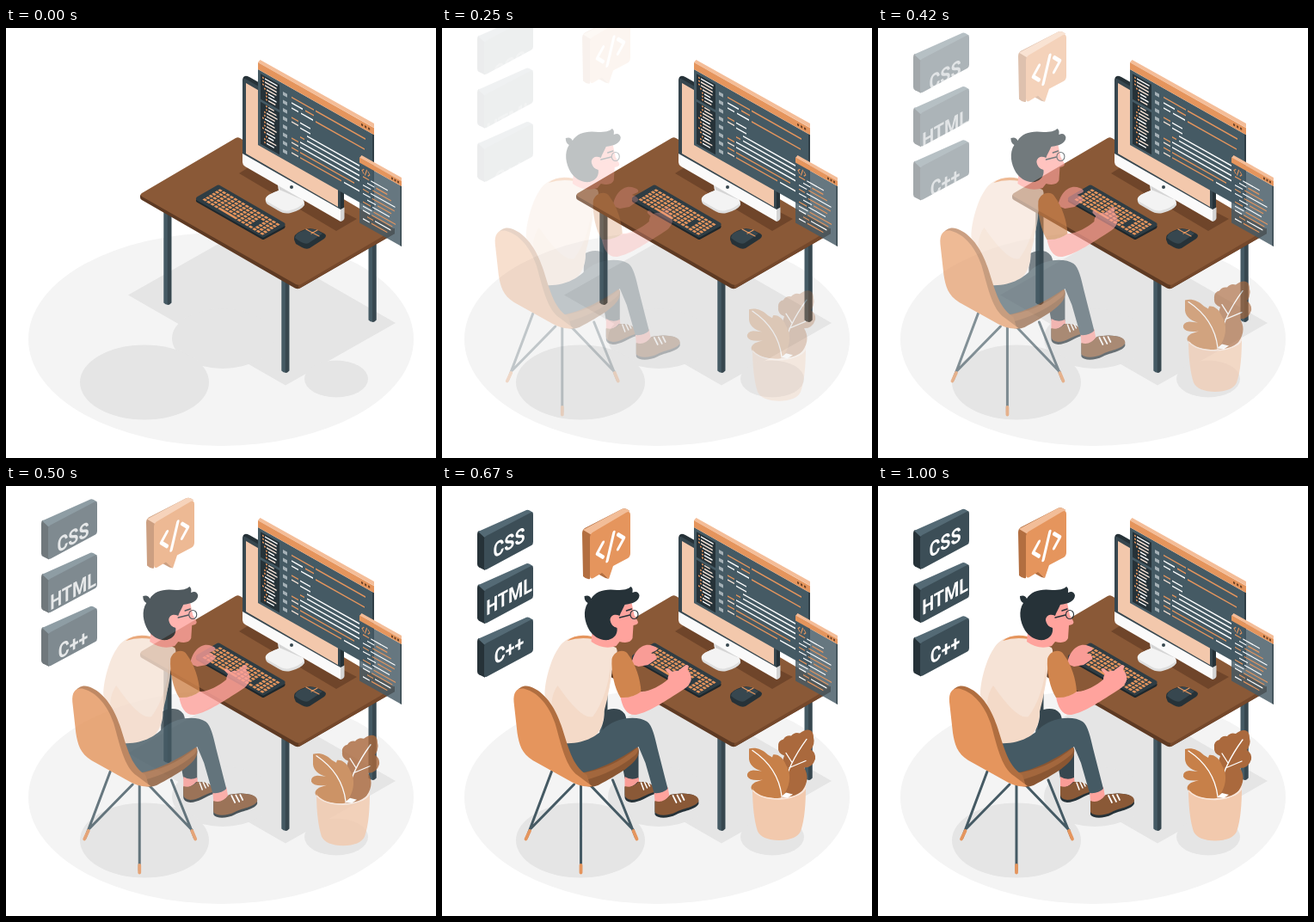
Write an HTML page that moves like this. It is 500 px wide and 500 px high and loops after 1.04 s.

```html
<!DOCTYPE html>
<html lang="en">
<head>
<meta charset="utf-8">
<title>Developer at a desk</title>
<style>
html, body { margin: 0; width: 100%; height: 100%; overflow: hidden; background: #fff; }
svg { display: block; width: 100%; height: 100%; }
text { font: 700 24px Roboto, Arial, sans-serif; fill: #fff; text-anchor: middle; }
.line { fill: none; stroke-linecap: round; stroke-linejoin: round; }
</style>
</head>
<body>
<svg viewBox="0 0 500 500">
  <!-- floor -->
  <ellipse cx="250" cy="362" rx="224" ry="124" fill="#f4f4f4"/>
  <g fill="#e5e5e5">
    <path d="M142 310.500L270 238 453 343 325 415.500Z"/>
    <ellipse cx="252" cy="361" rx="59" ry="35"/>
    <ellipse cx="161" cy="412" rx="75" ry="43.500"/>
    <ellipse cx="384" cy="408" rx="37" ry="21.500"/>
  </g>

  <!-- desk -->
  <g id="deskLegs"></g>
  <path d="M156 194V197Q156 199 158 200L336 302.500Q339 304 342 302.500L452 239V233L340 296Z" fill="#5e3a23"/>
  <path d="M340 297V303.300L452 239V233Z" fill="#75482b"/>
  <path d="M158 192Q155 194 158 196L337 298Q340 299.500 343 298L452 234 272 128Q269.500 126.500 267 128Z" fill="#8a5937"/>
  <path d="M271 169L287 159 408 222 384 236Z" fill="#6f452a"/>

  <!-- monitor -->
  <path d="M302 198Q303 194 317 189L316 180 343 195V198Q348 202 347 206 343 212 331 215 324 217 316 212L304 205Q301 202 302 198Z" fill="#dedede"/>
  <path d="M302 198Q303 194 317 189L316 180 343 195V198Q348 201 346 204 341 209 330 212 324 214 316 209L304 202Q301 200 302 198Z" fill="#f3f3f3"/>
  <path d="M317 182L343 197 343 199 318 188Z" fill="#d5d5d5"/>
  <path d="M275 62Q275 53 283 57L389 117Q393 119 393 124V211L389 213 275 148Z" fill="#263238"/>
  <path d="M275 63Q275 57 280 60L385 120Q389 122 389 127V213L275 148Z" fill="#37474f"/>
  <path d="M279 64L386 126V208L279 146Z" fill="#f3c8ac"/>
  <path d="M275 146L389 211V225L278 161Q275 159 275 156Z" fill="#fafafa"/>
  <path d="M389 211L393.500 208.500V221Q393 224 389 225Z" fill="#d4d4d4"/>
  <circle cx="332" cy="185" r="2" fill="#37474f"/>

  <!-- large window -->
  <path d="M293 40L295.500 37 428 111V116Z" fill="#f4bd98"/>
  <g transform="matrix(1 .565 0 1 293 40)">
    <path d="M0 8H135V96H0Z" fill="#455a64"/>
    <path d="M133 8H135V96H133Z" fill="#2f3e46"/>
    <path d="M0 0H135V8H0Z" fill="#e5955d"/>
    <path d="M120 3h2.200v2.500h-2.200zM124 3h2.200v2.500h-2.200zM128 3h2.200v2.500h-2.200z" fill="#6e4428"/>
    <path d="M3 11.500H25V41H3ZM3 44H25V93H3Z" fill="#263238"/>
    <g id="code" stroke-width="1.600"></g>
  </g>

  <!-- small window -->
  <path d="M411 151L413.500 148 460 174V178Z" fill="#f4bd98"/>
  <g transform="matrix(1 .56 0 1 411 150.500)">
    <path d="M0 6H49V76H0Z" fill="#455a64" opacity=".82"/>
    <path d="M47.500 6H49V76H47.500Z" fill="#37474f"/>
    <path d="M0 0H49V6H0Z" fill="#e5955d"/>
    <path d="M37 2h2v2.500h-2zM40.500 2h2v2.500h-2zM44 2h2v2.500h-2z" fill="#6e4428"/>
    <path class="line" d="M5 11L3 13.500 5 16M8.500 10L6.500 17M10 11L12 13.500 10 16" stroke="#e5955d"/>
    <g id="notes" stroke-width="1.300"></g>
  </g>

  <!-- keyboard and mouse -->
  <g stroke-width="5" stroke-linejoin="round">
    <path d="M223.500 200.500L247 187 322 231 299 243.500Z" fill="#1d272c" stroke="#1d272c"/>
    <path d="M223.500 198.500L247 185 322 228.500 299 241Z" fill="#2f3d44" stroke="#2f3d44"/>
  </g>
  <path id="keys" transform="matrix(.78 .46 -.26 .16 247 183)" fill="#e5955d"/>
  <path d="M335 246Q334 240 343 236 352 231 362 235L370 239Q374 241 370 245L353 256Q349 258 344 255L337 251Z" fill="#263238"/>
  <path d="M336 244Q337 238 345 236 353 232 361 235L368 239Q364 242 352 250 347 253 336 244Z" fill="#37474f"/>
  <path class="line" d="M349 234Q356 238 364 242M355 239L362 235" stroke="#e5955d" stroke-width="1.200"/>

  <!-- plant -->
  <g id="plant">
    <ellipse cx="392" cy="351" rx="31" ry="13" fill="#f8e2d5"/>
    <path d="M429 285Q424 282 416 288 410 286 406 291 400 290 397 295 390 297 391 304 390 311 398 314 395 321 397 328L392 362Q410 366 419 355C426 345 426 336 421 328Q431 328 434 318 435 311 429 307 434 300 432 293Q432 287 429 285Z" fill="#aa693d"/>
    <path class="line" d="M397 352Q402 325 424 295M407 322L400 311M404 328L423 320" stroke="#fff" stroke-width="1.300"/>
    <path d="M357 306C364 304 372 306 379 313L384 316 385 313C391 312 397 317 400 325 407 335 405 353 394 363 380 365 365 361 360 353Q358 349 364 345L373 342Q358 344 355 338 354 332 362 331L372 332Q358 328 357 318Z" fill="#c78049"/>
    <path class="line" d="M361 308Q391 328 395 361" stroke="#fff" stroke-width="1.300"/>
    <path d="M361 352C361 372 363 390 367 402Q372 412 392 412.500 412 412 417 402C422 388 423 368 423 350A31 13 0 0 1 361 352Z" fill="#f2c9ad"/>
    <path class="line" d="M362 355Q370 364 392 364.500 415 363 422.500 352" stroke="#fae7db" stroke-width="1.500"/>
    <path d="M394 362L400 357 408 359 402 363Z" fill="#fff"/>
  </g>

  <!-- person and chair -->
  <g id="person">
    <g class="line" stroke="#455a64" stroke-width="3">
      <path d="M127 332L98 409M153 347L103 398M161 346V447M198 342L225 409M173 349L222 400"/>
      <path d="M101.500 401L97 410.500M161 441V449.500M222 401L226 410.500" stroke="#e5955d" stroke-width="3.800"/>
    </g>
    <path d="M186 263Q196 257 206 260 213 263 214 272L228 308V341Q220 345 212 340L208 318 186 290Z" fill="#37474f"/>
    <path d="M212 338Q220 343 228 339L229 346Q221 354 212 350Z" fill="#f99c96"/>
    <path d="M212 350Q220 352 227 344 241 343 245 350L247 358C238 361 229 368 220 368Q212 367 212 362Z" fill="#263238"/>
    <path d="M212 349Q220 352 228 344 242 343 246 351L246 356C237 358 229 365 220 365Q212 364 212 359Z" fill="#8a5937"/>
    <path class="line" d="M231 345L234 353M235 344.500L238 351M239 345L241 349" stroke="#fff" stroke-width="1.500"/>

    <path d="M148 177Q160 172 174 177L202 188C206 195 199 206 197 215 196 235 189 248 188 262 189 276 182 292 168 297L145 305 119 243C119 225 127 200 134 190 138 183 143 179 148 177Z" fill="#f6e3d6"/>
    <path d="M196 205Q192 245 175 268 162 273 134 232 128 240 127 252L145 305 168 297Q187 288 188 262 196 235 196 205Z" fill="#f4dac8"/>
    <path d="M145 180Q156 171 174 175L175 178Q160 175 145 180Z" fill="#e5955d"/>

    <path d="M246 354L262 350 264 361Q256 370 247 367Z" fill="#ffa39d"/>
    <path d="M140 299C165 301 180 290 190 280 205 268 228 267 238 274 244 278 247 292 250 305L262 352Q256 358 246 357L236 322 228 303C215 314 190 332 162 337L148 325Z" fill="#455a64"/>
    <path d="M247 367Q256 371 265 359 280 356 291 359 298 362 298 369C296 376 282 377 272 382 262 387 250 387 247 382Z" fill="#263238"/>
    <path d="M247 366Q256 370 265 359 280 356 291 359 298 361 298 366C296 373 282 374 272 379 262 384 250 384 247 379Z" fill="#8a5937"/>
    <path class="line" d="M268 360L272 368M273 359.500L277 367M278 359L281 365" stroke="#fff" stroke-width="1.700"/>

    <path d="M158 334C185 331 214 312 226 304Q229 303 228 311C226 323 205 335 181 348Q174 351 168 349Z" fill="#8a5632"/>
    <path d="M158 334Q195 331 227 304 229 308 224 313 200 333 166 342Z" fill="#a3673d"/>
    <path d="M85 241C90 231 99 231 106 235 121 242 132 260 138 278 146 301 150 325 168 336L172 349Q148 340 130 300Z" fill="#b06e40"/>
    <path d="M83 251C82 238 88 234 96 236 111 240 124 255 131 276 138 300 143 327 158 337L174 349Q162 351 150 344L105 319C92 311 89 300 87 287Z" fill="#e5955d"/>

    <path d="M220 207C222 192 233 181 245 186Q251 188 249 191L242 194Q251 197 249 201L239 208 228 210Z" fill="#f99c96"/>
    <path d="M207 245Q221 247 230 239C240 240 254 232 262 225 262 218 268 214 274 215L283 208Q288 207 285 214 290 218 289 226 287 233 278 238C262 248 241 263 225 266 214 267 209 257 207 245Z" fill="#ffa39d"/>
    <path class="line" d="M262 214L267 219M279 217L272 223" stroke="#ffa39d" stroke-width="4"/>
    <path d="M197 201C200 191 212 189 216 196 225 208 230 224 231 239Q221 247 207 246C200 235 196 216 197 201Z" fill="#d0854e"/>

    <path d="M174 170L173 181Q187 191 202 186L206 181Q218 184 221 177L222 162Q229 161 227 157L223 150 220 136 190 143Z" fill="#ffa39d"/>
    <path d="M165 128Q171 126 173 131C178 122 190 119 203 121 211 121 216 120 219 117 222 119 221 122 221 124Q227 121 229 127C229 134 221 137 212 138 210 143 207 147 206 151 200 148 195 151 195 156 196 162 200 164 203 165 204 172 200 177 193 179 183 180 176 175 171 168 165 158 163 145 169 136Q165 134 165 128Z" fill="#263238"/>
    <ellipse cx="201" cy="157" rx="5" ry="7" fill="#ffa39d" transform="rotate(-15 201 157)"/>
    <path class="line" d="M206 153L218 150" stroke="#263238" stroke-width="1.300"/>
    <ellipse class="line" cx="223" cy="149.500" rx="4.500" ry="5" stroke="#263238" stroke-width="1.100"/>
    <path class="line" d="M214 145L220 143" stroke="#263238" stroke-width="1.500"/>
  </g>

  <!-- floating signs -->
  <g id="boxes"></g>
  <g id="labels"></g>
  <g id="bubble">
    <path d="M163 54Q163 50 166 48L207 27Q211 24 215 26L218 28 173 57 172 107Q168 108 164 104Z" fill="#b26e40"/>
    <path d="M164 50L207 27Q211 24 215 26L218.500 28 174 56Z" fill="#f2bd98"/>
    <path d="M181 101L186 99 194 107 190 106Z" fill="#b26e40"/>
    <path d="M172 59Q172 55 175 53L214 30Q219 27 219 33V77Q219 81 216 83L199 92 194 107 186 100 176 106Q172 108 172 103Z" fill="#e5955d"/>
    <path class="line" transform="matrix(.866 -.47 0 1 196 69)" d="M-10 -9L-18 0 -10 8M4.500 -14L-4.500 15M10 -9L18 -1 10 8" stroke="#fff" stroke-width="4"/>
  </g>
</svg>

<script>
const $ = id => document.getElementById(id);
const ORANGE = '#e5955d', PALE = '#f6e3d6', WHITE = '#fff', GREY = '#a5b1b7';

let seed = 7;
const rand = () => (seed = seed * 16807 % 2147483647) / 2147483647;
const bar = (x, y, end, color) => `<path d="M${x} ${y}H${end}" stroke="${color}"/>`;

function drawLegs() {
  const legs = [[183.3, 205, 322], [320.3, 288, 401], [421.5, 240, 342]];
  $('deskLegs').innerHTML = legs.map(([x, top, end]) =>
    `<path d="M${x} ${top}h9V${end - 2.5}Q${x + 4.5} ${end + 2} ${x} ${end - 2.5}Z" fill="#455a64"/>` +
    `<path d="M${x + 4.5} ${top}h4.5V${end - 2.5}Q${x + 7} ${end} ${x + 4.5} ${end}Z" fill="#37474f"/>`).join('');
}

function drawCode() {
  const rows = [
    [39, 18.5, 65, ORANGE], [67, 18.5, 125, ORANGE],
    [39, 25, 52, WHITE], [55, 25, 65, ORANGE],
    [39, 31, 47, WHITE], [50, 31, 64, WHITE], [67, 31, 124, ORANGE],
    [39, 42, 47, ORANGE], [49, 42.5, 61, WHITE],
    [39, 47, 47, PALE], [49, 48.5, 61, WHITE],
    [57, 53.5, 118, WHITE], [49, 59, 54, ORANGE], [57, 59, 118, WHITE],
    [39, 66, 47, ORANGE], [49, 65, 118, WHITE],
    [39, 71, 47, PALE], [49, 71, 118, WHITE],
    [39, 77, 47, ORANGE], [49, 77, 112, ORANGE],
    [39, 83, 47, PALE], [49, 83, 97, ORANGE], [100, 83, 118, WHITE]
  ];
  let out = rows.map(r => bar(...r)).join('');
  for (let y = 14.5; y < 92; y += 3.9) {
    if (y > 40 && y < 45) continue;
    const x = 7 + Math.floor(rand() * 3) * 2;
    out += bar(x - 2, y, x, ORANGE) + bar(x + 1, y, 18 + rand() * 5, rand() < .45 ? WHITE : PALE);
  }
  for (let i = 0; i < 8; i++) {
    out += `<path d="M29 ${17.5 + i * 9.5}h5v4h-5z" fill="${GREY}"/>`;
  }
  $('code').innerHTML = out;
}

function drawNotes() {
  let out = '';
  for (let i = 0; i < 11; i++) {
    const y = 20 + i * 4.9, x = 4 + (i % 4 === 1 ? 5 : 0), mid = x + 5 + rand() * 8;
    const flip = i % 3 === 0;
    out += bar(x, y, mid, flip ? ORANGE : WHITE) + bar(mid + 2, y, 27 + rand() * 16, flip ? WHITE : ORANGE);
  }
  $('notes').innerHTML = out;
}

function drawKeys() {
  let d = '';
  for (let r = 0; r < 6; r++) {
    for (let c = 0; c < 16; c++) {
      const gap = c === 12 && r > 1 && r < 5;
      const space = r === 5 && c > 3 && c < 9;
      if (gap || space) continue;
      d += `M${5.5 + c * 5.7} ${10 + r * 13.7}h4.2v9.500h-4.200z`;
    }
  }
  $('keys').setAttribute('d', d + 'M28.300 78.500h27v9.500h-27z');
}

function drawBadges() {
  const names = ['CSS', 'HTML', 'C++'], gap = 62.3;
  $('boxes').innerHTML = names.map((_, i) =>
    `<g transform="translate(0 ${i * gap})">
      <path d="M41 55Q41 52 43 51L50 57V97L43 93.500Q41 92.500 41 90Z" fill="#263238"/>
      <path d="M42 52L97 27.500Q99 26 102 27.500L106 30 49.500 59Z" fill="#546a75"/>
      <path d="M49 61Q49 58 51.500 57L103 30Q106 28.500 106 32V64Q106 67 104 68L52 96Q49 97.500 49 94Z" fill="#3c4e57"/>
    </g>`).join('');
  $('labels').innerHTML = names.map((name, i) =>
    `<text transform="matrix(.82 -.45 0 1 78 ${73.5 + i * gap})">${name}</text>`).join('');
}

// Cubic bezier easing (.36, -.01, .5, 1.38), solved by bisection.
function ease(x) {
  if (x >= 1) return 1;
  const curve = (a, b, s) => 3 * a * s * (1 - s) ** 2 + 3 * b * s * s * (1 - s) + s ** 3;
  let lo = 0, hi = 1;
  for (let i = 0; i < 30; i++) {
    const mid = (lo + hi) / 2;
    if (curve(.36, .5, mid) < x) lo = mid; else hi = mid;
  }
  return curve(-.01, 1.38, lo);
}

const LOOP = 1040, RATE = 24, LEAD = .035;
// Boxes and bubble enter twice over: double travel, squared fade.
const movers = [
  { el: $('person'), dx: -30, dy: 0, fade: 1 },
  { el: $('plant'), dx: 0, dy: 30, fade: 1 },
  { el: $('labels'), dx: 0, dy: -30, fade: 1 },
  { el: $('boxes'), dx: 0, dy: -60, fade: 2 },
  { el: $('bubble'), dx: 0, dy: -60, fade: 2 }
];
const start = performance.now();

function render() {
  const t = (performance.now() - start) % LOOP;
  const step = Math.floor((t + 5) * RATE / 1000);
  const p = step ? ease(step / RATE + LEAD) : 0;
  const shown = Math.max(0, Math.min(1, p));
  for (const { el, dx, dy, fade } of movers) {
    el.setAttribute('transform', `translate(${dx * (1 - p)} ${dy * (1 - p)})`);
    el.setAttribute('opacity', shown ** fade);
  }
  requestAnimationFrame(render);
}

drawLegs();
drawCode();
drawNotes();
drawKeys();
drawBadges();
render();
</script>
</body>
</html>
```
